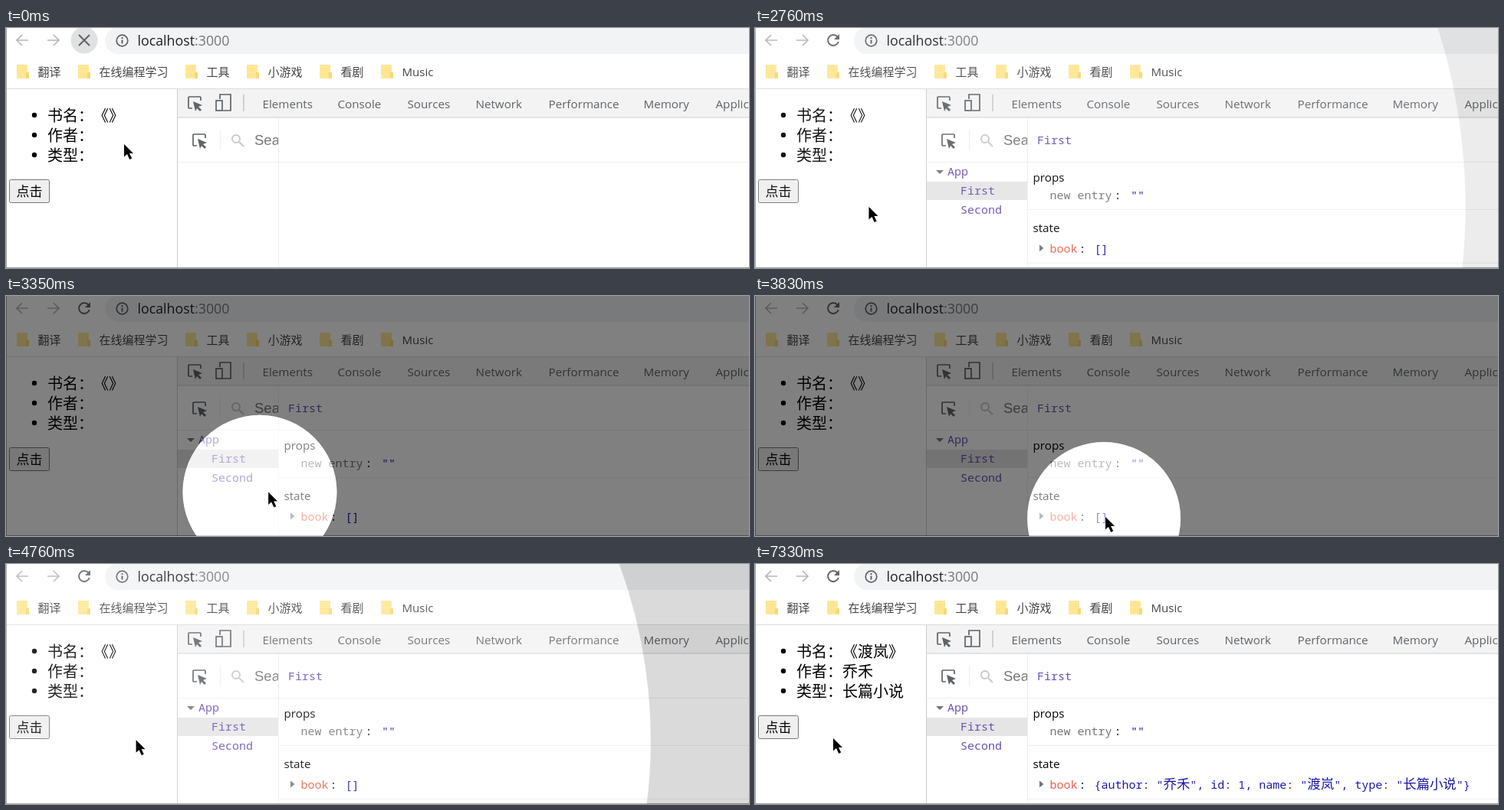
Animation, 969 px wide and 314 px high, one loop 8000 ms. Source, as an HTML page:

```html
<!DOCTYPE html>
<html lang="zh-CN">
<head>
<meta charset="utf-8">
<style>
html, body { margin: 0; width: 100%; height: 100%; overflow: hidden; background: #fff; }
svg { display: block; }
text { font-family: "Open Sans", "Noto Sans CJK SC", sans-serif; font-size: 15.2px; white-space: pre; text-spacing-trim: space-all; }
.tab { fill: #5f6368; }
.bookmark { fill: #444; font-size: 15px; }
.page { font: 20px "Noto Sans CJK SC", sans-serif; }
.mono { font: 15px "Noto Sans Mono", "Noto Sans CJK SC", monospace; }
.name { fill: #6a51b2; }
.value { fill: #1a1aa6; }
.value .han { font: 17.4px "Noto Sans CJK SC", sans-serif; }
.line { fill: none; stroke: #eee; }
.icon { fill: none; stroke: #5f6368; stroke-width: 1.7; }
</style>
</head>
<body>
<svg width="969" height="314" viewBox="0 0 969 314">
  <defs>
    <g id="folder">
      <path d="M1 0h12q1 0 1 1v16q0 1-1 1h-12q-1 0-1-1v-16q0-1 1-1z" fill="#ffe694"/>
      <path d="M12 10h4v7q0 1-1 1h-3z" fill="#f8d775"/>
    </g>
    <g id="inspect">
      <path class="icon" d="M6 16H2q-1 0-1-1V2q0-1 1-1h14q1 0 1 1v4"/>
      <path d="M7 7l12 5-5 2 4 4-2 2-4-4-2 4z" fill="#5f6368"/>
    </g>
    <clipPath id="treeClip"><rect x="224" y="118" width="131" height="195"/></clipPath>
  </defs>
  <rect width="969" height="314" fill="#fff"/>

  <!-- Browser toolbar -->
  <g class="icon" style="stroke:#b5b7ba">
    <path d="M29 16H14m7-7l-7 7 7 7M54 16h15m-7-7l7 7-7 7"/>
  </g>
  <circle id="halo" cx="102" cy="16" r="17.5" fill="#e0e1e3"/>
  <path id="stop" class="icon" style="stroke-width:2" d="M95 9l14 14m0-14l-14 14"/>
  <g id="reload">
    <path class="icon" style="stroke-width:2" d="M107.500 11.500a7 7 0 1 0 1.300 6.500"/>
    <path d="M110 8v7h-7z" fill="#5f6368"/>
  </g>
  <rect x="129" y="-1" width="900" height="35" rx="17.500" fill="#f1f3f4"/>
  <circle class="icon" cx="151.500" cy="16.500" r="7.300"/>
  <path class="icon" style="stroke-width:2" d="M151.500 15.500v5m0-8.500v2"/>
  <text x="171.500" y="22.500" style="font-size:17.800px" fill="#202124">localhost<tspan fill="#75787c">:3000</tspan></text>
  <g id="bookmarks"></g>
  <path d="M0 79.500H969" stroke="#dcdcdc"/>

  <!-- Page -->
  <circle cx="37" cy="114" r="3.200"/><circle cx="37" cy="140" r="3.200"/><circle cx="37" cy="166" r="3.200"/>
  <text class="page" x="54" y="121.500">书名：</text><text id="title" class="page" x="114" y="121.500"></text>
  <text class="page" x="54" y="147.500">作者：</text><text id="author" class="page" x="114" y="147.500"></text>
  <text class="page" x="54" y="173.500">类型：</text><text id="genre" class="page" x="114" y="173.500"></text>
  <rect id="button" x="4.500" y="198.500" width="52" height="30" rx="2"/>
  <text class="page" style="font-size:17px" x="13.500" y="220">点击</text>

  <!-- Developer tools -->
  <rect x="224" y="80" width="745" height="37" fill="#f3f3f3"/>
  <path d="M223.500 80V314M224 117H969" stroke="#ccc"/>
  <use href="#inspect" x="237" y="89"/>
  <g class="icon"><path d="M279 93v-6h14v21h-10"/><rect x="274" y="95" width="8" height="13"/></g>
  <path d="M310 87V109" stroke="#c4c4c4" stroke-width="1.500"/>
  <g id="tabs"></g>
  <path class="line" d="M224 175.500H969M355.500 118V314M279.500 133V160"/>
  <use href="#inspect" x="243" y="138"/>
  <path class="icon" style="stroke:#c9c9c9;stroke-width:2" d="M304 149l6 6"/>
  <circle class="icon" style="stroke:#c9c9c9;stroke-width:2" cx="300" cy="145" r="5"/>
  <g clip-path="url(#treeClip)">
    <text x="324" y="153" style="font:18.500px 'Liberation Sans',sans-serif" fill="#777">Search</text>
  </g>

  <g id="inspector">
    <rect x="224" y="201" width="131" height="24" fill="#e5e5e5"/>
    <path d="M236 186h10l-5 5zM371 283.500v9l5.500-4.500z" fill="#777"/>
    <g class="name">
      <text class="mono" x="251" y="193">App</text>
      <text class="mono" x="268" y="218">First</text>
      <text class="mono" x="268" y="243">Second</text>
      <text class="mono" x="368" y="152">First</text>
    </g>
    <text x="362.500" y="201">props</text>
    <text class="mono" x="384.500" y="224" fill="#777">new entry<tspan dx="3" fill="#000">:</tspan></text>
    <text class="mono value" x="490" y="224">""</text>
    <path class="line" d="M356 237.500H969M356 307.500H969"/>
    <text x="362.500" y="267">state</text>
    <text class="mono" x="384.500" y="294" fill="#e9604a">book<tspan dx="2" fill="#000">:</tspan></text>
    <text id="emptyState" class="mono value" x="442.500" y="294">[]</text>
    <text id="fullState" class="mono value" x="442.500" y="294"></text>
  </g>
  <g id="tooltip">
    <rect x="362" y="233" width="158" height="33" rx="5" fill="#000" fill-opacity=".9"/>
    <text x="373" y="255.500" style="font-size:15.600px" fill="#fff">Expand prop value</text>
  </g>
  <path d="M.5 0V314M0 313.500H969" stroke="#a0a0a0"/>

  <!-- Pointer and its spotlight -->
  <g id="spotlight">
    <path id="shade" fill-rule="evenodd"/>
    <circle id="glow" fill="#fff"/>
  </g>
  <path id="pointer" d="M0 0V16.500L4 13l3.200 7 3-1.400L7 12h5z" stroke="#fff" stroke-width="1" paint-order="stroke"/>
</svg>
<script>
const LOOP = 8000;
const book = { title: "渡岚", author: "乔禾", genre: "长篇小说" };
const el = id => document.getElementById(id);
const show = (id, on) => el(id).style.display = on ? "" : "none";
const within = (t, from, to) => t >= from && t < to;
const set = (id, attributes) => {
  for (const key in attributes) el(id).setAttribute(key, attributes[key]);
};

el("bookmarks").innerHTML =
  [[14, "翻译"], [94, "在线编程学习"], [234, "工具"], [314, "小游戏"], [409, "看剧"], [489, "Music"]]
    .map(([x, label]) => `<use href="#folder" x="${x}" y="48"/><text class="bookmark" x="${x + 27.5}" y="63">${label}</text>`).join("");
el("tabs").innerHTML =
  [[334, "Elements"], [432, "Console"], [523, "Sources"], [612, "Network"], [707, "Performance"], [831, "Memory"], [925, "Application"]]
    .map(([x, label]) => `<text class="tab" x="${x + 0.5}" y="104.5">${label}</text>`).join("");
const han = s => `<tspan class="han">${s}</tspan>`;
el("fullState").innerHTML =
  `{author: "${han(book.author)}", id: 1, name: "${han(book.title)}", type: "${han(book.genre)}"}`;

// Pointer path: time, x, y
const path = [
  [0, 154, 152], [690, 154, 152], [1000, 148, 229], [1190, 148, 229], [1300, 148, 234],
  [2760, 148, 234], [2980, 248, 254], [3200, 318, 256], [3450, 358, 257], [3550, 358, 257],
  [3760, 455, 291], [3830, 457, 289], [4300, 461, 288], [4400, 461, 288], [4555, 177, 231],
  [4650, 177, 231], [5100, 147, 228], [5230, 147, 228], [5480, 44, 217], [6660, 44, 217],
  [6840, 102, 228], [LOOP, 102, 228]
];
function pointerAt(t) {
  const i = path.findIndex(p => p[0] > t);
  const [t0, x0, y0] = path[i - 1], [t1, x1, y1] = path[i];
  const k = (t - t0) / (t1 - t0);
  return [x0 + (x1 - x0) * k, y0 + (y1 - y0) * k];
}

function drawSpotlight(t) {
  const active = within(t, 2760, 5180);
  show("spotlight", active);
  if (!active) return;
  const opening = 2747.5, closing = 4660, ease = 82;
  const strength = t < closing ? 1 - Math.exp((opening - t) / ease) : Math.exp((closing - t) / ease);
  const r = 900 - 800 * strength;
  const [x, y] = pointerAt(t - 70); // the light trails the pointer
  const opacity = strength / 2;
  set("shade", {
    d: `M0 0H969V314H0zM${x - r} ${y}a${r} ${r} 0 1 0 ${2 * r} 0a${r} ${r} 0 1 0 ${-2 * r} 0z`,
    "fill-opacity": opacity
  });
  set("glow", { cx: x, cy: y, r, "fill-opacity": opacity });
}

function draw(t) {
  const loading = t < 300 || within(t, 900, 1860);
  show("halo", t < 2760);
  show("stop", loading);
  show("reload", !loading);
  show("inspector", within(t, 300, 1250) || t >= 1600);
  show("tooltip", within(t, 4130, 4750));

  const filled = t >= 6420;
  el("title").textContent = filled ? `《${book.title}》` : "《》";
  el("author").textContent = filled ? book.author : "";
  el("genre").textContent = filled ? book.genre : "";
  show("emptyState", t < 7330);
  show("fullState", t >= 7330);

  const pressed = within(t, 6360, 6420), hover = within(t, 5450, 6700);
  set("button", {
    fill: pressed ? "#f5f5f5" : hover ? "#e5e5e5" : "#efefef",
    stroke: pressed ? "#8d8d8d" : hover ? "#4f4f4f" : "#767676"
  });

  drawSpotlight(t);
  set("pointer", { transform: `translate(${pointerAt(t)})` });
}

const start = performance.now();
function tick() {
  draw((performance.now() - start) % LOOP);
  requestAnimationFrame(tick);
}
tick();
</script>
</body>
</html>
```
